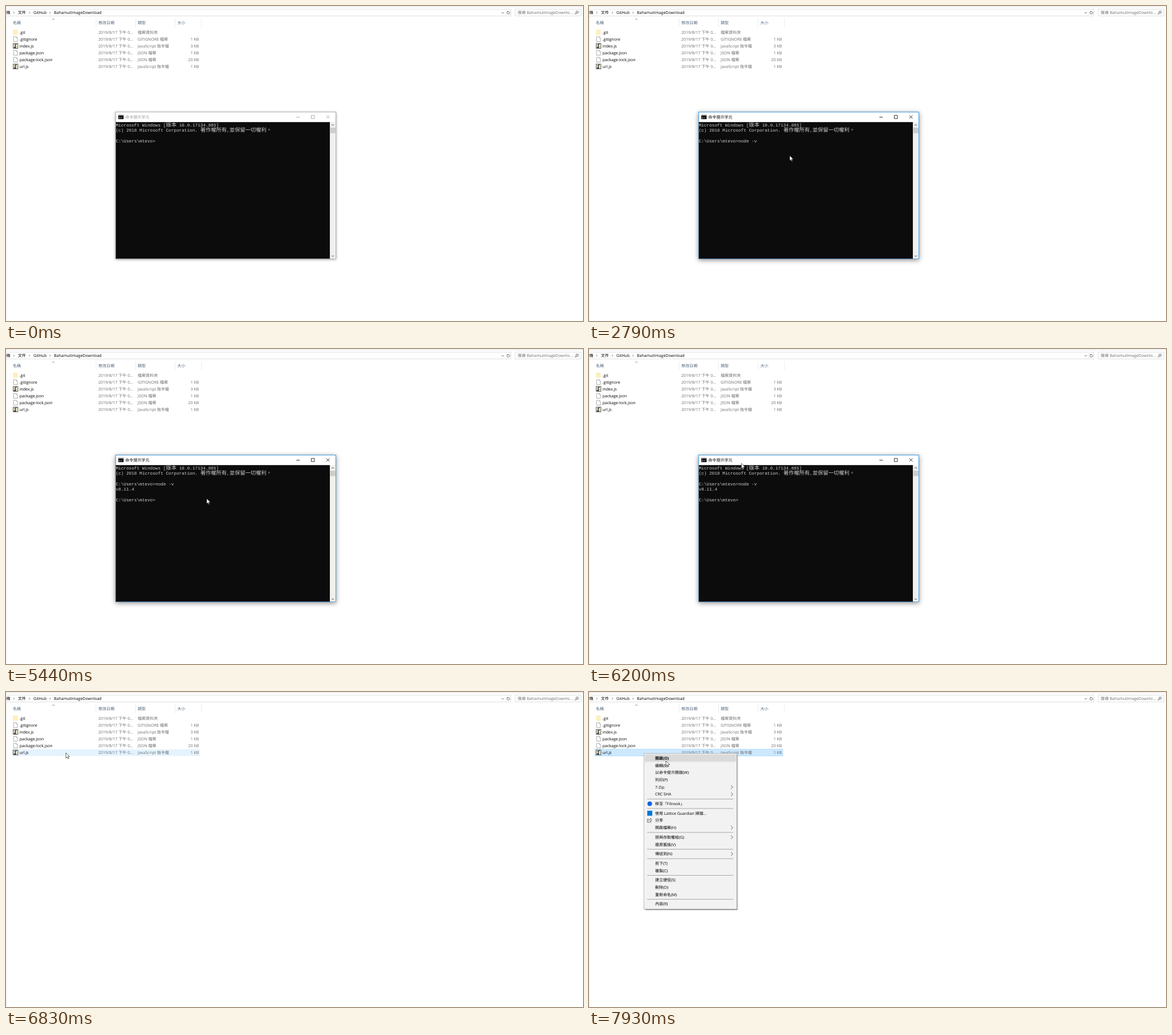
Animation of 1012x554 px, one loop 8 s. Source, as an HTML page:

```html
<!DOCTYPE html>
<html lang="zh-Hant">
<head>
<meta charset="utf-8">
<title>命令提示字元</title>
<style>
  html, body { margin: 0; width: 100%; height: 100%; overflow: hidden; background: #fff; }
  svg { display: block; width: 100%; height: 100%; }
  text {
    font: 7.06px "Open Sans", "Noto Sans CJK TC", "Noto Sans CJK", sans-serif;
    white-space: pre;
    text-rendering: geometricPrecision;
  }
  .mono { font: 7.73px "Liberation Mono", monospace; fill: #ccc; }
  .wide { font: 9.28px "Noto Sans CJK TC", "Noto Sans CJK", sans-serif; fill: #ccc; }
  .menu text { font-size: 6.95px; }
  .line { fill: none; stroke: currentColor; }
  #win { color: #999; }
  #frame { fill: #fff; stroke: #a6a6a6; filter: drop-shadow(0 1px 2px #0006); }
  #win.active { color: #000; }
  #win.active #frame { stroke: #1883d7; filter: drop-shadow(0 2px 4px #0007); }
</style>
</head>
<body>
<svg id="stage" viewBox="0 0 1012 554" preserveAspectRatio="none"></svg>
<script>
const LOOP = 8000;
const CELL = 4.64, LINE = 9.28, LEFT = 192.4;
const PROMPT = 'C:\\Users\\mtevo>';
const COMMAND = 'node -v';
const KEY_TIMES = [1240, 1630, 1780, 2010, 2320, 2640, 2790];

// y is the vertical centre of the text
const text = (x, y, s, fill = '#000', extra = '') =>
  `<text x="${x}" y="${y + 2.5}" fill="${fill}" ${extra}>${s}</text>`;
const rect = (x, y, w, h, fill, extra = '') =>
  `<rect x="${x}" y="${y}" width="${w}" height="${h}" fill="${fill}" ${extra}/>`;
const path = (d, color = '#000', width = 0.7) =>
  `<path class="line" d="${d}" style="color:${color}" stroke-width="${width}"/>`;

const chevron = (x, y, size = 1.7, color = '#444') =>
  path(`M${x - size / 2} ${y - size}l${size} ${size}l${-size} ${size}`, color);

const caret = (x, y, dir, size = 2, color = '#444', width = 0.8) =>
  path(`M${x - size} ${y - dir * size / 2}l${size} ${dir * size}l${size} ${-dir * size}`, color, width);

const icons = {
  folder: y => rect(12.7, y - 4.3, 7.4, 8.6, '#fdf1bd') +
    path(`M13 ${y - 4}h3.5l.7 1h2.6v7h-6.8z`, '#f5e3a0', 0.5),
  page: y => `<path d="M13.3 ${y - 4.2}h4.6l2.2 2.2v6.3h-6.8z" fill="#fff" stroke="#8a8a8a" stroke-width=".7"/>` +
    path(`M17.8 ${y - 4.2}v2.3h2.3`, '#8a8a8a', 0.5),
  script: y => rect(12.7, y - 4.3, 8.2, 8.6, '#eeeedd', 'stroke="#333" stroke-width=".8"') +
    path(`M18.8 ${y - 3}q-4 0-2.6 2.4t-2.4 3.6h4`, '#222', 1.3) +
    path(`M14.2 ${y - 2.6}l1.2 1.4M18 ${y + .5}l1.6 1`, '#b09a30', 0.9)
};

const FILES = [
  ['folder', '.git', '檔案資料夾', ''],
  ['page', '.gitignore', 'GITIGNORE 檔案', '1 KB'],
  ['script', 'index.js', 'JavaScript 指令檔', '3 KB'],
  ['page', 'package.json', 'JSON 檔案', '1 KB'],
  ['page', 'package-lock.json', 'JSON 檔案', '20 KB'],
  ['script', 'url.js', 'JavaScript 指令檔', '1 KB']
];

function explorer() {
  const headings = [[12, '名稱'], [162, '修改日期'], [231, '類型'], [300.5, '大小']];
  const crumbs = [[0.5, '機'], [20.8, '文件'], [48, 'GitHub'], [84, 'BahamutImageDownload']];
  const box = 'stroke="#d9d9d9" stroke-width=".8"';
  return rect(0, 1, 1012, 0.8, '#dcdcdc') +
    rect(0, 18, 0.7, 536, '#e4e4e4') +
    rect(-2, 5.4, 887.5, 12.2, '#fff', box) +
    rect(893, 5.4, 115.6, 12.2, '#fff', box) +
    rect(875.6, 5.6, 0.5, 12, '#e4e4e4') +
    crumbs.map(([x, s]) => text(x, 11.6, s)).join('') +
    [13.7, 41.2, 77.3].map(x => chevron(x, 11.7)).join('') +
    caret(871.3, 12, 1) +
    path('M882.7 9.8a2.5 2.5 0 1 1-3.2 0M879 9.4h2v2', '#333') +
    text(897.5, 11.6, '搜尋 BahamutImageDownlo...', '#6d6d6d') +
    '<circle cx="1001.7" cy="10.8" r="2" class="line" style="color:#333" stroke-width=".8"/>' +
    path('M1000.2 12.3l-2.6 2.6', '#333', 1) +
    caret(83, 23.2, -1, 2, '#555', 0.7) +
    headings.map(([x, s]) => text(x, 29.4, s, '#4c607a')).join('') +
    [158, 227.3, 296.5, 342.8].map(x => rect(x - 0.3, 22, 0.6, 15, '#dedede')).join('') +
    rect(10.4, 100.6, 329.6, 12, '#e5f3ff', 'id="row" stroke-width=".6"') +
    FILES.map(([icon, name, type, size], i) => {
      const y = 46 + i * 12.08;
      return icons[icon](y) + text(23.7, y, name) +
        text(162, y, '2019/8/17 下午 0...', '#6d6d6d') +
        text(231, y, type, '#6d6d6d') +
        text(338.4, y, size, '#6d6d6d', 'text-anchor="end"');
    }).join('');
}

// Console text sits on a cell grid; CJK characters take two cells
function consoleLine(row, s, id = '', col = 0) {
  const runs = s.match(/[\u3000-\uffef]+|[^\u3000-\uffef]+/g) || [''];
  return runs.map(run => {
    const wide = run.charCodeAt(0) >= 0x3000;
    const x = LEFT + col * CELL;
    col += run.length * (wide ? 2 : 1);
    return `<text class="${wide ? 'wide' : 'mono'}" ${id} x="${x}" y="${212 + row * LINE}">${run.replace('>', '&gt;')}</text>`;
  }).join('');
}

function terminal() {
  return '<g id="win">' +
    '<rect id="frame" x="192.3" y="186.4" width="386.2" height="258.2" stroke-width=".8"/>' +
    rect(197, 191.6, 9.2, 7.4, '#000') + rect(197, 191.6, 9.2, 1.2, '#b5b5b5') +
    '<text x="198" y="197.6" fill="#fff" style="font-size:4px;font-weight:700">C:\\</text>' +
    text(209.3, 195.4, '', 'currentColor', 'id="title"') +
    '<path class="line" stroke-width=".8" d="M509.3 195.5h6M535.4 192.4h5.6v5.6h-5.6zM561.8 192.3l5.6 5.6m0-5.6l-5.6 5.6"/>' +
    rect(192.6, 204.2, 375.6, 240.1, '#0c0c0c') +
    rect(568.2, 204.2, 9.9, 240.1, '#f0f0f0') +
    rect(568.7, 214, 9, 9.6, '#cdcdcd') +
    caret(573.1, 209.2, -1, 2, '#444', 1) + caret(573.1, 439.8, 1, 2, '#444', 1) +
    consoleLine(0, 'Microsoft Windows [版本 10.0.17134.885]') +
    consoleLine(1, '(c) 2018 Microsoft Corporation. 著作權所有,並保留一切權利。') +
    consoleLine(3, PROMPT) +
    consoleLine(3, '', 'id="typed"', PROMPT.length) +
    '<g id="output">' + consoleLine(4, 'v8.11.4') + consoleLine(6, PROMPT) + '</g>' +
    rect(0, 0, CELL, 1.2, '#ccc', 'id="cursor"') + '</g>';
}

// '-' is a separator, a trailing '>' marks a submenu
const MENU = ['開啟(O)', '編輯(E)', '以命令提示開啟(W)', '列印(P)', '7-Zip>', 'CRC SHA>', '-',
  '移至「Filnook」', '-', '使用 Lattice Guardian 掃描...', '分享', '開啟檔案(H)>', '-',
  '授與存取權給(G)>', '還原舊版(V)', '-', '傳送到(N)>', '-', '剪下(T)', '複製(C)', '-',
  '建立捷徑(S)', '刪除(D)', '重新命名(M)', '-', '內容(R)'];

function contextMenu() {
  let y = 110;
  const items = MENU.map((item, i) => {
    if (item === '-') {
      y += 4;
      return rect(102, y - 2.4, 151, 0.8, '#959595');
    }
    const mid = y + 6.35;
    y += 12.7;
    return text(116, mid, item.replace('>', ''), '#000', i ? '' : 'font-weight="700" style="font-weight:700"') +
      (item.endsWith('>') ? chevron(250.6, mid, 3.2, '#222') : '');
  }).join('');
  return '<g id="menu" class="menu">' +
    rect(98.5, 110.5, 162, 273, '#000', 'opacity=".45" style="filter:blur(.7px)"') +
    rect(96.2, 108.1, 163, 273.8, '#f2f2f2', 'stroke="#a0a0a0" stroke-width=".7"') +
    rect(98, 110, 159.6, 12.7, '#dadada', 'id="pick"') + items +
    '<circle cx="106.5" cy="196.5" r="4" fill="#0f62e6"/>' +
    rect(102.2, 208.8, 8.8, 8.8, '#0078d7') +
    path('M105 223.6h-2.6v5.4h6.2v-2M104.4 227q.3-3.2 3.6-3.2v-1.7l2.4 2.6-2.4 2.5v-1.6q-2.300-3.600 1.4z', '#333', 0.7) +
    '</g>';
}

const stage = document.getElementById('stage');
stage.innerHTML = explorer() + terminal() + contextMenu() +
  '<circle id="click" r="7" fill="#ff0" opacity=".5"/>' +
  '<path id="pointer" d="M0 0V9.300L2.200 7.300 3.600 10.500 5 9.900 3.600 6.700H6.600Z" fill="#fff" stroke="#000" stroke-width=".6"/>';

const ui = {};
stage.querySelectorAll('[id]').forEach(el => ui[el.id] = el);
const show = (el, on) => el.setAttribute('display', on ? 'inline' : 'none');
const within = (t, ...spans) => spans.some(([a, b]) => t >= a && t < b);

const easeOut = p => 1 - (1 - p) ** 2;
const smooth = p => p * p * (3 - 2 * p);

// start, end, steps, from, to, easing
const MOVES = [
  [70, 540, 7, [1137, 651], [352, 263], easeOut],
  [5740, 5820, 2, [352, 263], [324, 234], smooth],
  [5970, 6590, 9, [324, 234], [105, 107], smooth],
  [6950, 7220, 5, [105, 107], [96, 107], smooth],
  [7630, 7930, 5, [96, 107], [135, 121], smooth]
];

// The pointer is sampled at a fixed rate, so it advances in steps
function pointerAt(t) {
  const [start, end, steps, from, to, ease] = MOVES.filter(m => t >= m[0]).pop() || MOVES[0];
  const k = t < start ? 0 : Math.min(steps, 1 + Math.floor((t - start) / (end - start) * (steps - 1) + 1e-6));
  const p = ease(k / steps);
  return from.map((v, i) => v + (to[i] - v) * p);
}

function render(t) {
  const [x, y] = pointerAt(t);
  const move = `translate(${x} ${y})`;
  ui.pointer.setAttribute('transform', move);
  ui.click.setAttribute('transform', `translate(${x - 0.5} ${y - 0.5})`);
  show(ui.click, within(t, [710, 860], [6660, 6830], [7390, 7460]));

  const selected = t >= 6950;
  show(ui.row, selected || (x < 340 && y > 100.6 && y < 112.6));
  ui.row.setAttribute('fill', selected ? '#cce8ff' : '#e5f3ff');
  ui.row.setAttribute('stroke', selected ? '#99d1ff' : 'none');

  show(ui.win, t < 6830);
  ui.win.setAttribute('class', within(t, [710, 6660]) ? 'active' : '');
  ui.title.textContent = '命令提示字元' + (within(t, [3340, 3420]) ? ' - node  -v' : '');

  const typed = KEY_TIMES.filter(k => t >= k).length;
  const done = t >= 3420;
  ui.typed.textContent = COMMAND.slice(0, typed);
  show(ui.output, done);
  show(ui.cursor, within(t, [1320, 1780], [1860, 2790], [3420, 4410], [4960, 5440]));
  ui.cursor.setAttribute('x', LEFT + (PROMPT.length + (done ? 0 : typed)) * CELL);
  ui.cursor.setAttribute('y', 211.6 + (done ? 6 : 3) * LINE);

  show(ui.menu, t >= 7630);
  show(ui.pick, y >= 110);
}

const began = performance.now();
function tick() {
  render((performance.now() - began) % LOOP);
  requestAnimationFrame(tick);
}
tick();
</script>
</body>
</html>
```
